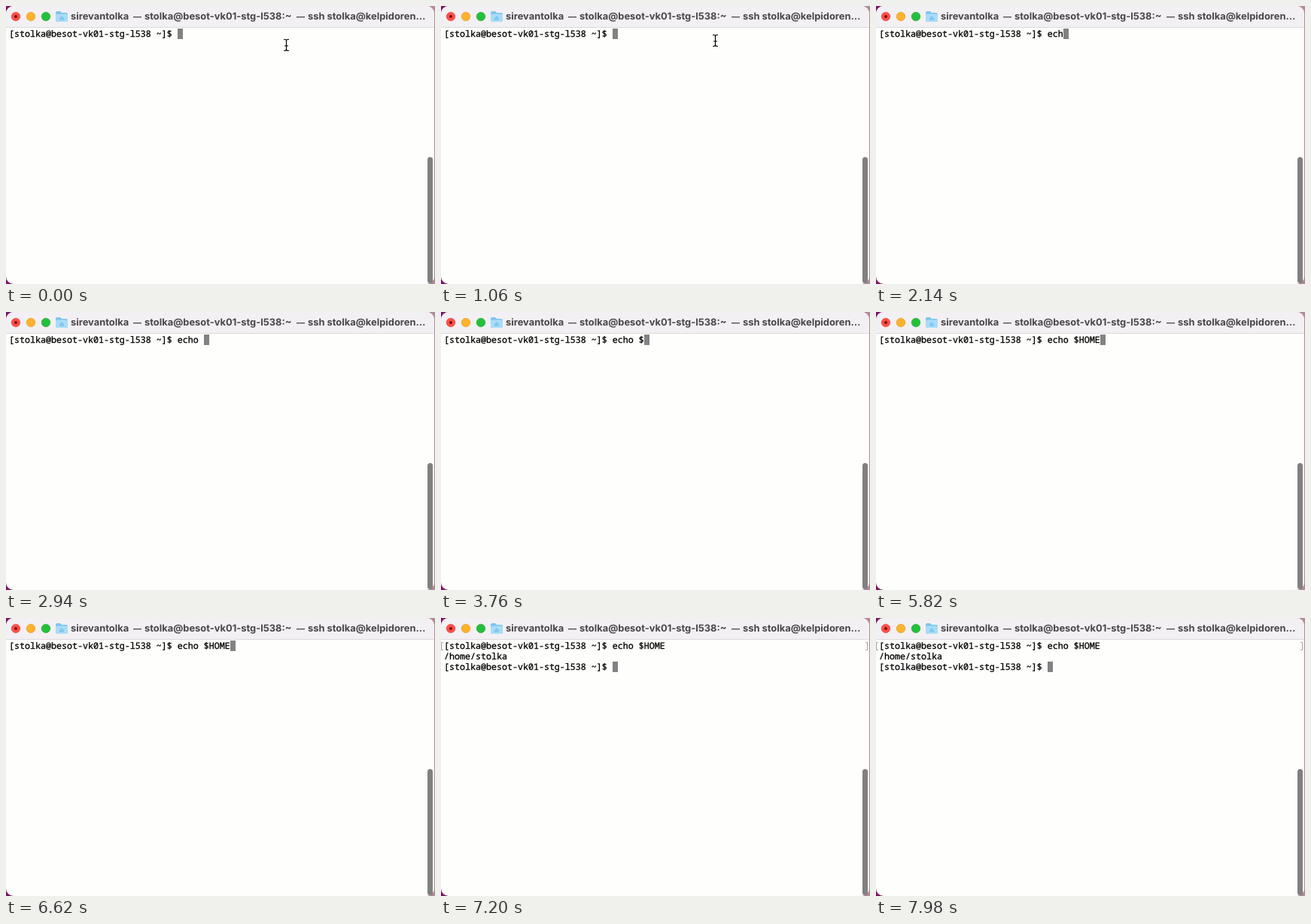
An HTML page for the animation above (8000 ms loop, 570 by 370 pixels).

```html
<!DOCTYPE html>
<html lang="en">
<head>
<meta charset="utf-8">
<title>Terminal</title>
<style>
  html, body { margin: 0; width: 100%; height: 100%; overflow: hidden; background: #fefefc; }
  svg { display: block; }
  text { white-space: pre; text-rendering: geometricPrecision; }
  .title { font: 700 12.9px Inter, sans-serif; fill: #48464a; }
  .dash { font-size: 11px; }
  .term { font: 500 11.6667px "Noto Sans Mono", monospace; fill: #000; stroke: #000; stroke-width: .3; }
</style>
</head>
<body>
<svg width="570" height="370" viewBox="0 0 570 370">
  <defs>
    <linearGradient id="desk">
      <stop offset="0" stop-color="#7c1468"/>
      <stop offset="1" stop-color="#b08c98"/>
    </linearGradient>
    <clipPath id="frame"><rect width="569" height="370" rx="10"/></clipPath>
    <path id="beam" d="M-3.5-7.5H-2Q0-7.5 0-5.5V5.5Q0 7.5-2 7.5H-3.5M3.5-7.5H2Q0-7.5 0-5.5M0 5.5Q0 7.5 2 7.5H3.5M-2.5 1H2.5" fill="none"/>
  </defs>
  <rect width="570" height="370" fill="url(#desk)"/>
  <g clip-path="url(#frame)">
    <rect width="570" height="370" fill="#fefefc"/>
    <rect width="570" height="28" fill="#f3f0f3"/>
    <rect y="28" width="570" height="1" fill="#dcdadc"/>
  </g>
  <g stroke-width=".6">
    <circle cx="13" cy="14" r="5.8" fill="#fc5048" stroke="#dc3c38"/>
    <circle cx="13" cy="14" r="2" fill="#7c0a08"/>
    <circle cx="33" cy="14" r="5.8" fill="#fcb22c" stroke="#dc9820"/>
    <circle cx="53" cy="14" r="5.8" fill="#24c03c" stroke="#18a42c"/>
  </g>
  <path d="M66 9q0-2 2-2h4l2 2h6q2 0 2 2v8q0 2-2 2H68q-2 0-2-2z" fill="#7cc4ec"/>
  <rect x="66" y="10.5" width="16" height="10.5" rx="1.5" fill="#a8dcf8"/>
  <path d="M71 16l3-3 3 3v3h-6z" fill="#84c8ec"/>
  <g class="title">
    <text x="86" y="18">sirevantolka</text>
    <text class="dash" x="169" y="17.5">—</text>
    <text x="184" y="18">stolka@besot-vk01-stg-l538:~</text>
    <text class="dash" x="386" y="17.5">—</text>
    <text x="401" y="18">ssh stolka@kelpidoren…</text>
  </g>
  <rect x="560" y="201" width="7" height="168" rx="3.5" fill="#808080"/>
  <path id="marks" d="M3 32.5H.5V42.5H3M564 32.5H566.5V42.5H564" fill="none" stroke="#a4a4a4"/>
  <rect id="caret" y="30" width="7" height="14" fill="#828282"/>
  <g class="term">
    <text x="4" y="41"></text>
    <text x="4" y="55"></text>
    <text x="4" y="69"></text>
  </g>
  <g id="pointer">
    <use href="#beam" stroke="#fff" stroke-width="3"/>
    <use href="#beam" stroke="#000" stroke-width="1.2"/>
  </g>
</svg>
<script>
const LOOP = 8000, CHAR = 7, LINE = 14;
const PROMPT = "[stolka@besot-vk01-stg-l538 ~]$ ";
const COMMAND = "echo $HOME";
const KEY_TIMES = [1560, 1820, 2040, 2360, 2760, 3480, 4360, 4680, 5200, 5560];
const ENTER = 7200;

const $ = id => document.getElementById(id);
const rows = document.querySelectorAll(".term text");
const show = (el, on) => el.setAttribute("visibility", on ? "visible" : "hidden");

function draw(t) {
  const typed = COMMAND.slice(0, KEY_TIMES.filter(k => k <= t).length);
  const done = t >= ENTER;
  const lines = done ? [PROMPT + typed, "/home/stolka", PROMPT] : [PROMPT + typed, "", ""];
  lines.forEach((line, i) => {
    if (rows[i].textContent !== line) rows[i].textContent = line;
  });

  const last = done ? 2 : 0;
  $("caret").setAttribute("x", 4 + lines[last].length * CHAR);
  $("caret").setAttribute("y", 30 + last * LINE);
  show($("marks"), done);

  const p = Math.min(t / 400, 1), ease = p * p * (3 - 2 * p);
  $("pointer").setAttribute("transform", `translate(${372.5 - 8 * ease} ${52 - 6 * ease})`);
  show($("pointer"), t < KEY_TIMES[0]);
}

const start = performance.now();
function tick() {
  draw((performance.now() - start) % LOOP);
  requestAnimationFrame(tick);
}
tick();
</script>
</body>
</html>
```
